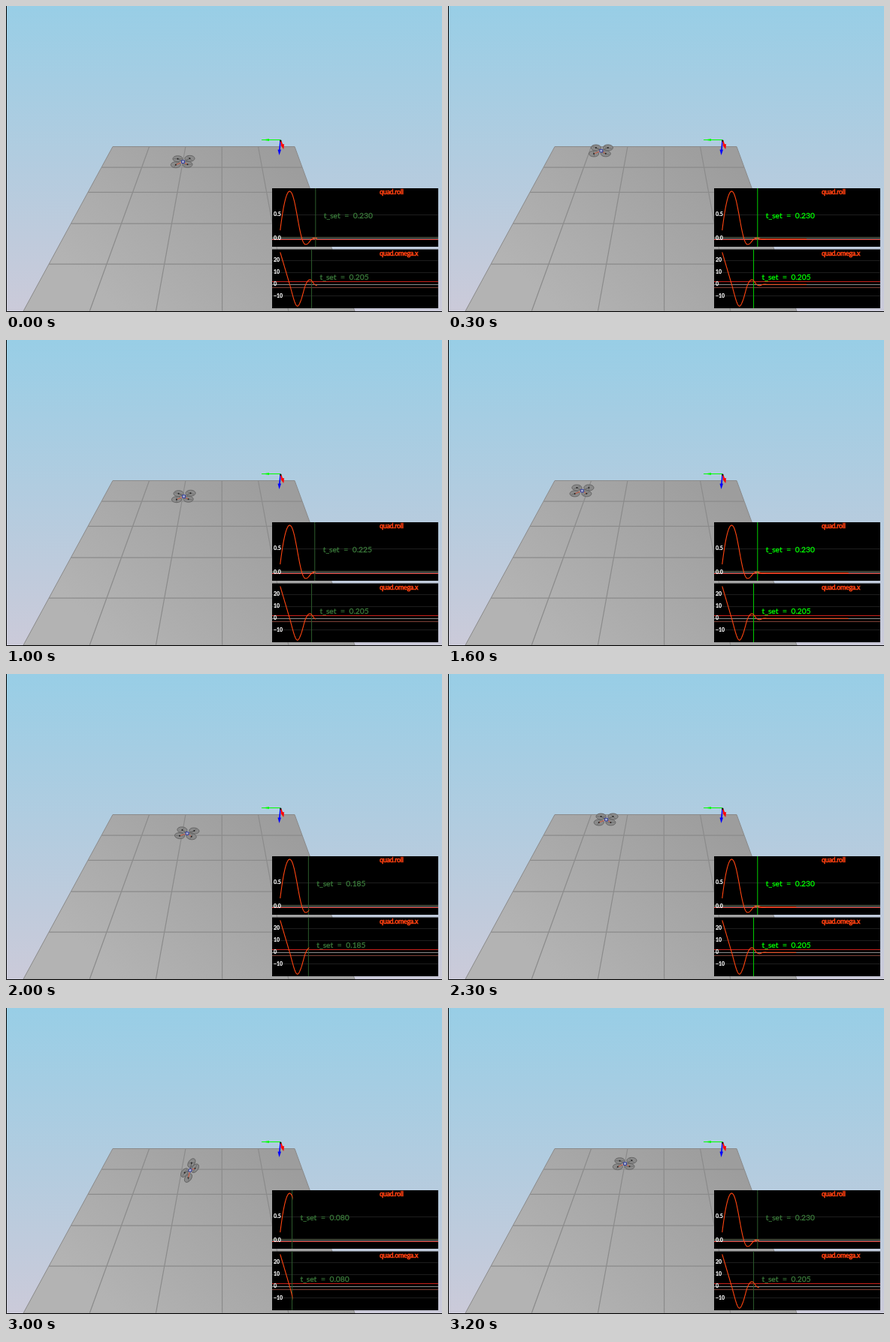
Write an HTML page that moves like this. It is 580 by 408 pixels and loops after 3.3 s.

```html
<!DOCTYPE html>
<html lang="en">
<head>
<meta charset="utf-8">
<title>Quad attitude control</title>
<style>
html, body { margin: 0; width: 100%; height: 100%; overflow: hidden; }
svg { display: block; font-family: Lato, sans-serif; }
.title { font-size: 8.8px; letter-spacing: -.2px; fill: #ff4010; stroke: #ff4010; stroke-width: .6px; }
.axis { font-size: 7px; font-weight: bold; fill: #fff; stroke: #fff; stroke-width: .2px; }
.time { font-size: 10.2px; stroke-width: .3px; }
.curve { fill: none; stroke: #ff4510; stroke-width: 1.1; }
</style>
</head>
<body>
<svg width="580" height="408" viewBox="0 0 580 408">
  <defs>
    <linearGradient id="sky" x1="0" y1="0" x2="0" y2="1">
      <stop offset="0" stop-color="#98cee6"/><stop offset="1" stop-color="#cbcad9"/>
    </linearGradient>
    <linearGradient id="ground" gradientUnits="userSpaceOnUse" x1="350" y1="188" x2="150" y2="407">
      <stop offset="0" stop-color="#9d9d9d"/><stop offset="1" stop-color="#b3b3b3"/>
    </linearGradient>
    <clipPath id="seen"><rect id="reveal" x="354" y="243" height="160"/></clipPath>
  </defs>
  <rect width="580" height="408" fill="url(#sky)"/>
  <path d="M142 187.5H384L464 407H23Z" fill="url(#ground)" stroke="#8a8a8a"/>
  <path id="tiles" stroke="#8b8b8b" stroke-width="1.2" fill="none"/>
  <path d="M.5 0V407.5H580" fill="none" stroke="#000"/>
  <g id="axes">
    <path d="M365 178.5H340" stroke="#0f0"/>
    <path d="M342 178.5L350 177V180Z" fill="#0f0"/>
    <path d="M365 180L363.8 193" stroke="#00f" stroke-width="1.6"/>
    <path d="M361.5 191.5H366L363.5 199Z" fill="#00f"/>
    <path d="M365.5 180L368 187" stroke="#f00" stroke-width="2"/>
    <path d="M365 185L370 184L369.3 191Z" fill="#f00"/>
    <circle cx="365.3" cy="179.7" r="1.2" fill="#111"/>
  </g>
  <g id="quad"></g>
  <g id="panels"></g>
</svg>
<script>
const NS = "http://www.w3.org/2000/svg";
const $ = id => document.getElementById(id);

function add(parent, tag, attrs, text) {
  const el = document.createElementNS(NS, tag);
  for (const k in attrs) el.setAttribute(k, attrs[k]);
  if (text !== undefined) el.textContent = text;
  parent.appendChild(el);
  return el;
}

const clamp = (x, lo, hi) => Math.min(hi, Math.max(lo, x));
const segment = (p, x) => {
  let i = 0;
  while (i < p.length - 2 && x > p[i + 1][0]) i++;
  return i;
};

function piecewise(p, x) {
  const i = segment(p, x), [x0, y0] = p[i], [x1, y1] = p[i + 1];
  return y0 + (y1 - y0) * (x - x0) / (x1 - x0);
}

// Smooth Hermite curve through [x, y] points.
function spline(p) {
  const n = p.length - 1;
  const slope = i => {
    const a = p[Math.max(0, i - 1)], b = p[Math.min(n, i + 1)];
    return (b[1] - a[1]) / (b[0] - a[0]);
  };
  return x => {
    const i = segment(p, x), [x0, y0] = p[i], [x1, y1] = p[i + 1], w = x1 - x0;
    const u = clamp((x - x0) / w, 0, 1), v = 1 - u;
    return v * v * (1 + 2 * u) * y0 + u * u * (1 + 2 * v) * y1
      + u * v * w * (v * slope(i) - u * slope(i + 1));
  };
}

// Roll rate in rad/s over run time in s; roll is its running integral.
const omega = spline([[0, 30], [.066, 0], [.098, -15], [.117, -18.4], [.138, -13.3], [.168, 0],
  [.195, 4], [.224, 0], [.241, -1.1], [.265, 0], [.29, 0], [1, 0]]);
const STEP = .001, sums = [0];
for (let i = 0; i < 1010; i++) sums.push(sums[i] + STEP * omega((i + .5) * STEP));
const roll = t => sums[Math.round(t / STEP)];

const plotX = t => 363.5 + 210 * t;

// After the first kick the body coasts on a ballistic arc.
function place(t) {
  const u = Math.max(t, .15);
  return [262.3 - 118 * u + 16.5 * u * u, 193 + 139 * (u - .56) ** 2];
}

// Floor tiles in perspective
let tiles = "";
for (let i = 1; i < 5; i++) {
  const y = 1000 / (3.755 - .347 * i) - 78.3, f = (y - 188) / 219;
  tiles += `M${142 - 119 * f} ${y}H${384 + 80 * f}`;
  tiles += `M${142 + 48.4 * i} 188L${23 + 88.2 * i} 407`;
}
$("tiles").setAttribute("d", tiles);

// Quadcopter
const quad = $("quad");
const hubs = [[-7, -4], [9, -4.3], [-9.7, 4], [6, 3.7]];
const blades = hubs.map(([x, y]) => {
  add(quad, "ellipse", { cx: x, cy: y, rx: 6.6, ry: 4, fill: "#8a8a8a", stroke: "#626262", "stroke-width": .9 });
  return add(quad, "path", { stroke: "#6a6a6a", "stroke-width": .8 });
});
hubs.forEach(([x, y], i) => {
  add(quad, "path", { d: `M0 0L${x} ${y}`, stroke: i < 2 ? "#5a5a5a" : "#d9583c", "stroke-width": .9 });
  add(quad, "circle", { cx: x, cy: y, r: 1, fill: "#222" });
});
add(quad, "rect", { x: -2, y: -1.8, width: 4, height: 3.6, fill: "#a9b0cc", stroke: "#26329a", "stroke-width": .9 });

// Plots
function panel(o) {
  const g = add($("panels"), "g", {});
  const toY = v => o.zero - o.unit * v;
  const line = (y, stroke) => add(g, "path", { d: `M354 ${Math.floor(y) + .5}H575`, stroke });
  add(g, "rect", { x: 354, y: o.top, width: 221, height: o.bottom - o.top });
  o.ticks.forEach(v => v && line(toY(v), "#1d1d1d"));
  line(toY(o.band), o.limits[0]);
  line(toY(-o.band), o.limits[1]);
  line(toY(0), "#8b8b8b");
  const mark = add(g, "path", {});
  let d = "";
  for (let t = .006; t <= 1; t += .002) d += `${d ? "L" : "M"}${plotX(t)} ${toY(o.value(t)).toFixed(2)}`;
  add(g, "path", { d, class: "curve", "clip-path": "url(#seen)" });
  o.ticks.forEach(v => {
    const label = v.toFixed(o.digits).replace("-", "−");
    add(g, "text", { x: 356, y: toY(v) + 1.6, class: "axis" }, label);
  });
  add(g, "text", { x: 497, y: o.top + 8.3, class: "title" }, o.title);
  const note = ["t_set", "=", ""].map(s => add(g, "text", { y: o.text, class: "time" }, s));

  return t => {
    const set = Math.min(t, o.settle), x = plotX(set), done = t > o.settle + .1;
    mark.setAttribute("d", `M${x} ${o.top}V${o.bottom}`);
    mark.setAttribute("stroke", done ? "#00d000" : "#2c5a2c");
    note.forEach((el, i) => {
      const color = done ? "#00ff00" : "#3b7a3b";
      el.setAttribute("x", x + [11, 38.5, 50][i]);
      el.setAttribute("fill", color);
      el.setAttribute("stroke", color);
    });
    note[2].textContent = (Math.round(set * 200) / 200).toFixed(3);
  };
}

const RED = "#c8201a";
const panels = [
  panel({ title: "quad.roll", top: 243, bottom: 321, zero: 310, unit: 63.5, ticks: [0, .5], digits: 1,
    band: .025, limits: ["#5d6a55", RED], value: roll, settle: .23, text: 283 }),
  panel({ title: "quad.omega.x", top: 324.5, bottom: 403, zero: 371.2, unit: 1.57, ticks: [-10, 0, 10, 20], digits: 0,
    band: 2.5, limits: [RED, "#7d4036"], value: omega, settle: .205, text: 364.8 })
];

const LOOP = 3300;
// Wall time in ms to run time in s; each run lasts one second.
const clock = [[0, .235], [700, .937], [2000, 2.185], [2700, 2.85], [3200, 3.235]];

function draw(ms) {
  let tick = Math.floor(ms % LOOP / 100) * 100;
  if (tick > 2400 && tick < 2700) tick = 2400;
  const t = piecewise(clock, tick) % 1;
  const [x, y] = place(t);
  $("reveal").setAttribute("width", plotX(t) - 353);
  panels.forEach(update => update(t));
  quad.setAttribute("transform",
    `translate(${x.toFixed(2)} ${y.toFixed(2)}) rotate(${(-roll(t) * 57.3).toFixed(2)})`);
  blades.forEach((b, i) => {
    const a = t * 40 * (i % 3 ? 1 : -1) + i, dx = 5.6 * Math.cos(a), dy = 3.3 * Math.sin(a);
    const [hx, hy] = hubs[i];
    b.setAttribute("d", `M${hx - dx} ${hy - dy}L${hx + dx} ${hy + dy}`);
  });
}

const start = performance.now();
function loop() {
  draw(performance.now() - start);
  requestAnimationFrame(loop);
}
draw(0);
requestAnimationFrame(loop);
</script>
</body>
</html>
```
